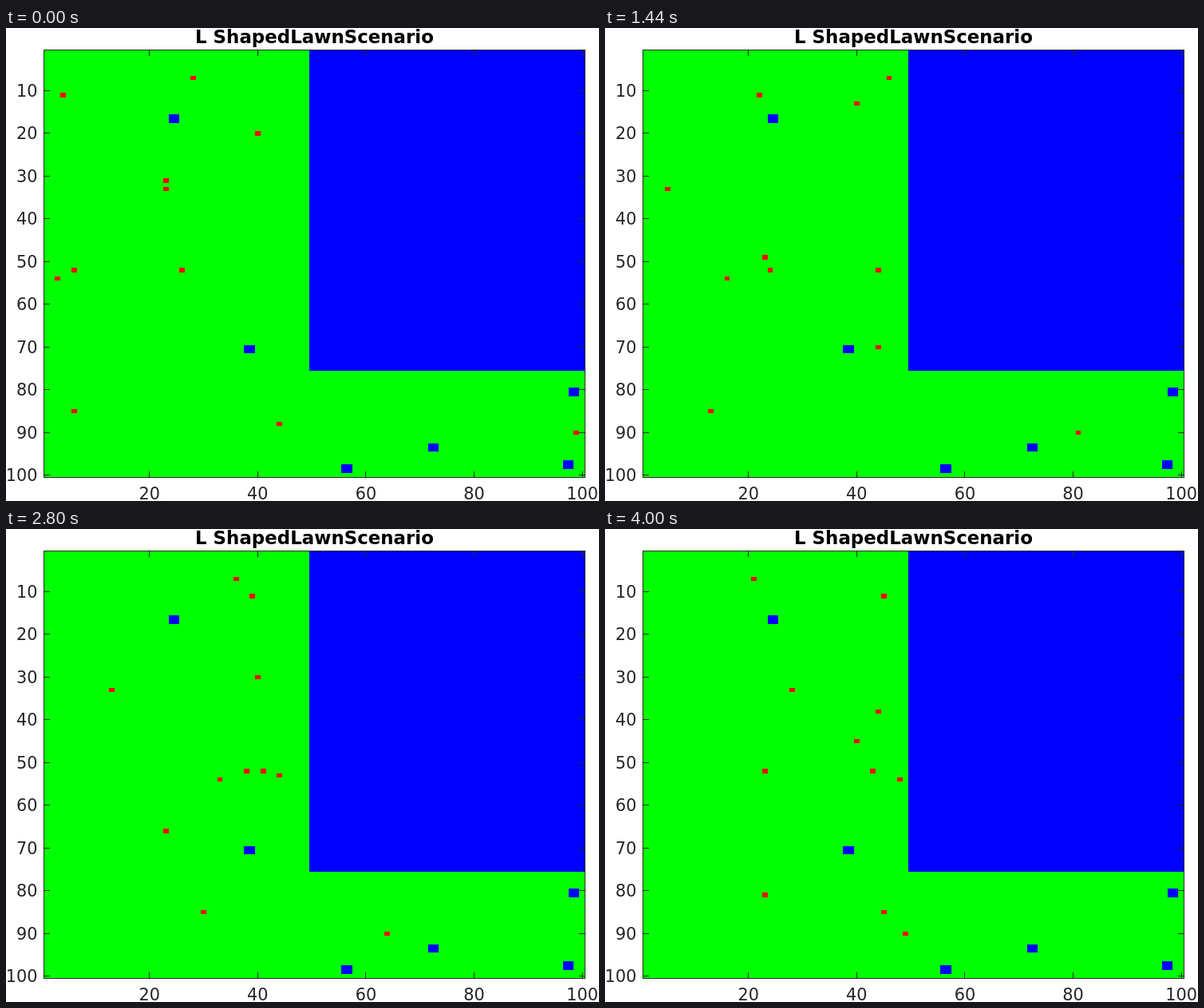
These frames come from a looping animation (743 by 592 pixels, 4080 ms). An HTML page:

```html
<!DOCTYPE html>
<html lang="en">
<head>
<meta charset="utf-8">
<title>Lawn scenario</title>
<style>
  html, body { margin: 0; width: 100%; height: 100%; overflow: hidden; background: #fff; }
  svg { display: block; width: 743px; height: 592px; }
  text { font-family: "DejaVu Sans", sans-serif; font-size: 20.83px; fill: #262626; }
  .title { font-size: 22.92px; font-weight: bold; fill: #000; }
  rect { shape-rendering: crispEdges; }
</style>
</head>
<body>
<svg id="stage" viewBox="0 0 743 592" xmlns="http://www.w3.org/2000/svg"></svg>
<script>
const STEP = 80, STEPS = 51;
const BLUE = '#00f', RED = '#f00', GREEN = '#0f0', AXIS = '#262626';
const stage = document.getElementById('stage');

// Pixel edge before a 1-based grid column or row
const edgeX = c => Math.round(47.95 + (c - 1) * 6.77);
const edgeY = r => Math.round(27.85 + (r - 1) * 5.345);

function add(tag, attrs, content) {
  const el = document.createElementNS(stage.namespaceURI, tag);
  setAll(el, attrs);
  if (content !== undefined) el.textContent = content;
  return stage.appendChild(el);
}

function setAll(el, attrs) {
  for (const key in attrs) el.setAttribute(key, attrs[key]);
}

function cells(col, row, w, h) {
  const x = edgeX(col), y = edgeY(row);
  return { x, y, width: edgeX(col + w) - x, height: edgeY(row + h) - y };
}

const block = (col, row, w, h, fill) => add('rect', { ...cells(col, row, w, h), fill });
const bar = (x, y, width, height) => add('rect', { x, y, width, height, fill: AXIS });

// Lawn, house and obstacles
block(1, 1, 100, 100, GREEN);
block(50, 1, 51, 75, BLUE);
[[24, 16], [38, 70], [98, 80], [72, 93], [56, 98], [97, 97]]
  .forEach(([col, row]) => block(col, row, 2, 2, BLUE));

// Mowers: start column, start row, axis, direction, turning limits
const mowers = [
  [28, 7, 'x', 1, 1, 49],
  [4, 11, 'x', 1, 1, 49],
  [40, 20, 'y', -1, 8, 100],
  [23, 31, 'y', 1, 1, 100],
  [23, 33, 'x', -1, 1, 49],
  [6, 52, 'x', 1, 1, 49],
  [26, 52, 'x', 1, 1, 49],
  [3, 54, 'x', -1, 1, 49],
  [6, 85, 'x', -1, 1, 100],
  [44, 88, 'y', -1, 1, 100],
  [99, 90, 'x', -1, 1, 100]
].map(([col, row, axis, dir, lo, hi]) =>
  ({ col, row, axis, dir, lo, hi, el: add('rect', { fill: RED }) }));

// Back-and-forth walk that rests one step at each end
function walk(start, dir, lo, hi, n) {
  const span = hi - lo + 1;
  const from = dir > 0 ? start - lo : 2 * span - 1 - (start - lo);
  const phase = (from + n) % (2 * span);
  return lo + (phase < span ? phase : 2 * span - 1 - phase);
}

// Axes
bar(47, 27, 679, 1);
bar(47, 562, 679, 1);
bar(47, 27, 1, 536);
bar(725, 27, 1, 536);
for (let v = 20; v <= 100; v += 20) {
  const x = 47.5 + (v - 0.5) * 6.78;
  bar(Math.floor(x), 28, 1, 7);
  bar(Math.floor(x), 555, 1, 7);
  add('text', { x, y: 590, 'text-anchor': 'middle' }, v);
}
for (let v = 10; v <= 100; v += 10) {
  const y = 27.5 + (v - 0.5) * 5.35;
  bar(48, Math.floor(y), 7, 1);
  bar(718, Math.floor(y), 7, 1);
  add('text', { x: 39.5, y: Math.round(y + 7.6), 'text-anchor': 'end' }, v);
}
add('text', { x: 386.5, y: 19, 'text-anchor': 'middle', class: 'title' }, 'L ShapedLawnScenario');

function draw(ms) {
  const n = Math.floor(ms / STEP) % STEPS;
  for (const m of mowers) {
    const along = m.axis === 'x';
    const pos = walk(along ? m.col : m.row, m.dir, m.lo, m.hi, n);
    setAll(m.el, along ? cells(pos, m.row, 1, 1) : cells(m.col, pos, 1, 1));
  }
}

const began = performance.now();
function tick() {
  draw(performance.now() - began);
  requestAnimationFrame(tick);
}
tick();
</script>
</body>
</html>
```
